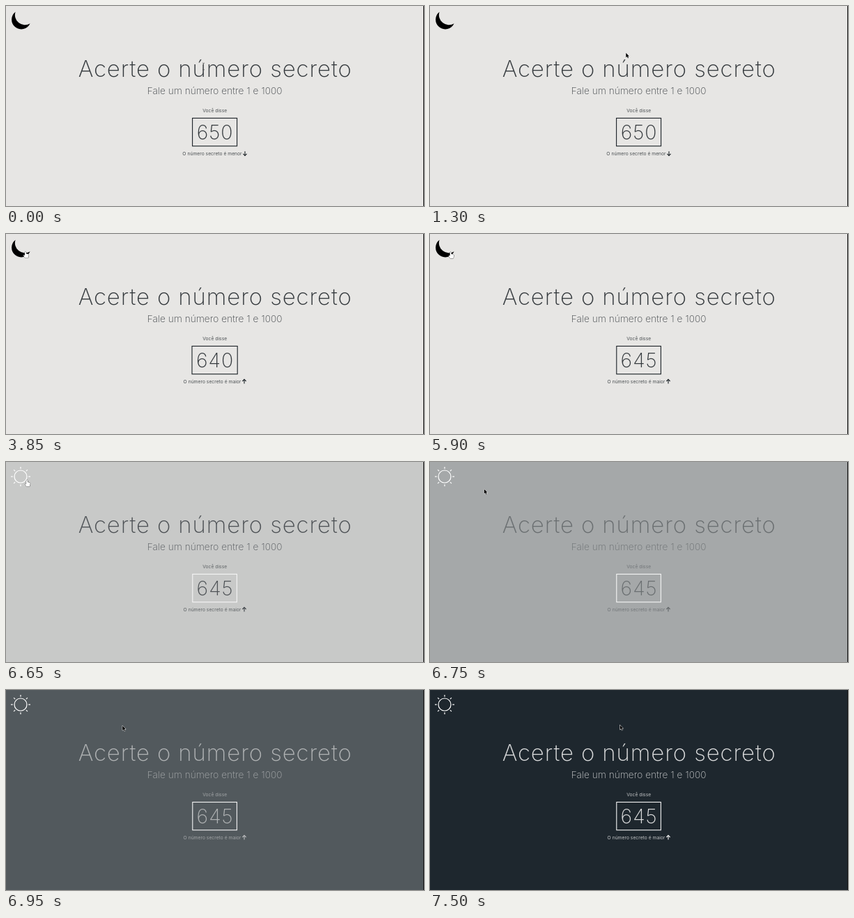
These frames come from a looping animation (600x288 px, 8000 ms). An HTML page with a canvas:

```html
<!DOCTYPE html>
<html lang="pt-BR">
<head>
<meta charset="utf-8">
<title>Acerte o número secreto</title>
<style>
  html, body { margin: 0; width: 100%; height: 100%; overflow: hidden; background: #e7e6e4; }
  canvas { display: block; width: 600px; height: 288px; }
</style>
</head>
<body>
<canvas id="stage" width="600" height="288"></canvas>
<script>
const ctx = document.getElementById('stage').getContext('2d');
const LOOP = 8000;
const THEME_CLICK = 6450;
const FADE = { start: 6434, length: 800 };

const LIGHT_BG = [231, 230, 228], DARK_BG = [30, 39, 46];
const LIGHT_INK = [27, 33, 38], DARK_INK = [245, 245, 245];

// Each guess: start time, digits, half width of its box, whether the secret is larger
const guesses = [
  { at: 0, value: '650', half: 32, larger: false },
  { at: 3200, value: '640', half: 32.6, larger: true },
  { at: 5750, value: '645', half: 31.8, larger: true }
];

const linear = u => u;
const smooth = u => u * u * (3 - 2 * u);
const easeOut = u => 1 - (1 - u) * (1 - u);

// Pointer stops: time, x, y, easing used to get there
const stops = [
  [0, 283.5, 87, linear],
  [600, 283.5, 87, linear],
  [950, 281.3, 67.6, smooth],
  [1750, 281.3, 67.6, linear],
  [1950, 265.8, 68.2, smooth],
  [2600, 265.8, 68.2, linear],
  [3850, 27.9, 25.2, easeOut],
  [5750, 27.9, 25.2, linear],
  [5900, 29.6, 25.8, smooth],
  [6650, 29.6, 25.8, linear],
  [6850, 124.9, 52, linear],
  [7500, 272.6, 50.4, easeOut],
  [LOOP, 272.6, 50.4, linear]
];

const moon = new Path2D('M13.6 8.4A13.9 13.9 0 1 0 34.6 25.3A14.4 14.4 0 0 1 13.6 8.4Z');
const arrowShape = new Path2D('M0 0V6.6L1.6 5.2L2.6 7.6L3.7 7.1L2.7 4.8H4.7Z');
const handShape = new Path2D('M-.9 .6Q0 -.6 .9 .6V3.1L3.9 3.8Q4.8 4.1 4.6 5.3L3.9 9.2H-.6L-2.6 6.2Q-2.9 5 -1.7 5.2L-.9 6Z');

const mix = (a, b, u) => a + (b - a) * u;
const mixColor = (a, b, u) => `rgb(${a.map((v, i) => Math.round(mix(v, b[i], u))).join(',')})`;

// Solves the cubic-bezier(.42, 0, .58, 1) curve by bisection
function easeInOut(x) {
  if (x <= 0) return 0;
  if (x >= 1) return 1;
  let lo = 0, hi = 1, s = 0.5;
  for (let i = 0; i < 24; i++) {
    s = (lo + hi) / 2;
    const bx = 3 * s * (1 - s) * (0.42 * (1 - s) + 0.58 * s) + s ** 3;
    if (bx < x) lo = s; else hi = s;
  }
  return s * s * (3 - 2 * s);
}

function text(str, x, y, size, weight, spacing, alpha) {
  ctx.font = `${weight} ${size}px Inter, "Open Sans", sans-serif`;
  ctx.letterSpacing = spacing + 'px';
  ctx.textAlign = 'center';
  ctx.globalAlpha = alpha;
  ctx.fillText(str, x + spacing / 2, y);
  ctx.globalAlpha = 1;
}

function line(...points) {
  ctx.beginPath();
  points.forEach(([x, y]) => ctx.lineTo(x, y));
  ctx.stroke();
}

function hintArrow(x, y, up) {
  const d = up ? -1 : 1;
  ctx.lineWidth = 1.1;
  line([x, y - 3.1 * d], [x, y + 3 * d]);
  line([x - 2.6, y + 0.4 * d], [x, y + 3 * d], [x + 2.6, y + 0.4 * d]);
}

function sun(x, y) {
  ctx.strokeStyle = '#fff';
  ctx.lineWidth = 1.2;
  ctx.beginPath();
  ctx.arc(x, y, 9, 0, Math.PI * 2);
  ctx.stroke();
  for (let i = 0; i < 8; i++) {
    const c = Math.cos(i * Math.PI / 4), s = Math.sin(i * Math.PI / 4);
    line([x + 11.2 * c, y + 11.2 * s], [x + 14 * c, y + 14 * s]);
  }
}

function pointerAt(t) {
  const i = Math.max(1, stops.findIndex(s => s[0] > t));
  const [t0, x0, y0] = stops[i - 1], [t1, x1, y1, ease] = stops[i];
  const u = ease((t - t0) / (t1 - t0));
  return [mix(x0, x1, u), mix(y0, y1, u)];
}

function drawPointer(t) {
  const [x, y] = pointerAt(t);
  ctx.save();
  ctx.translate(x, y);
  if (t < 820) {
    ctx.strokeStyle = '#555';
    ctx.lineWidth = 0.8;
    line([0, -4.5], [0, 4.5]);
    line([-1.5, -5], [0, -4.3], [1.5, -5]);
    line([-1.5, 5], [0, 4.3], [1.5, 5]);
  } else {
    const hand = x < 36 && y < 36;
    const shape = hand ? handShape : arrowShape;
    ctx.lineJoin = 'round';
    ctx.lineWidth = hand ? 0.8 : 1;
    ctx.strokeStyle = hand ? '#333' : '#fff';
    ctx.fillStyle = hand ? '#fff' : '#000';
    ctx.stroke(shape);
    ctx.fill(shape);
  }
  ctx.restore();
}

function draw(t) {
  const fade = easeInOut((t - FADE.start) / FADE.length);
  const dark = t >= THEME_CLICK;
  const ink = mixColor(LIGHT_INK, DARK_INK, fade);
  const guess = guesses.filter(g => g.at <= t).pop();

  ctx.fillStyle = mixColor(LIGHT_BG, DARK_BG, fade);
  ctx.fillRect(0, 0, 600, 288);

  if (dark) {
    sun(21, 21);
  } else {
    ctx.fillStyle = '#000';
    ctx.fill(moon);
  }

  ctx.fillStyle = ink;
  text('Acerte o número secreto', 299.8, 102.3, 33, 200, 0.87, 0.88);
  text('Fale um número entre 1 e 1000', 299.6, 127.4, 13.6, 200, 0.1, 0.85);
  text('Você disse', 299.7, 152.8, 6.75, 400, 0, 0.75);
  text(guess.value, 299.6, 192, 28.5, 200, 0.9, 0.88);
  text(`O número secreto é ${guess.larger ? 'maior' : 'menor'}`, 296, 215, 6.75, 400, 0, 0.75);

  ctx.strokeStyle = ink;
  hintArrow(guess.larger ? 342 : 343, 212.4, guess.larger);

  ctx.strokeStyle = dark ? '#f5f5f5' : ink;
  ctx.lineWidth = 1.1;
  ctx.strokeRect(299.6 - guess.half, 161.5, guess.half * 2, 40.2);

  drawPointer(t);

  ctx.fillStyle = '#111';
  ctx.fillRect(599, 0, 1, 288);
}

const began = performance.now();
function tick() {
  draw((performance.now() - began) % LOOP);
  requestAnimationFrame(tick);
}
tick();
</script>
</body>
</html>
```
